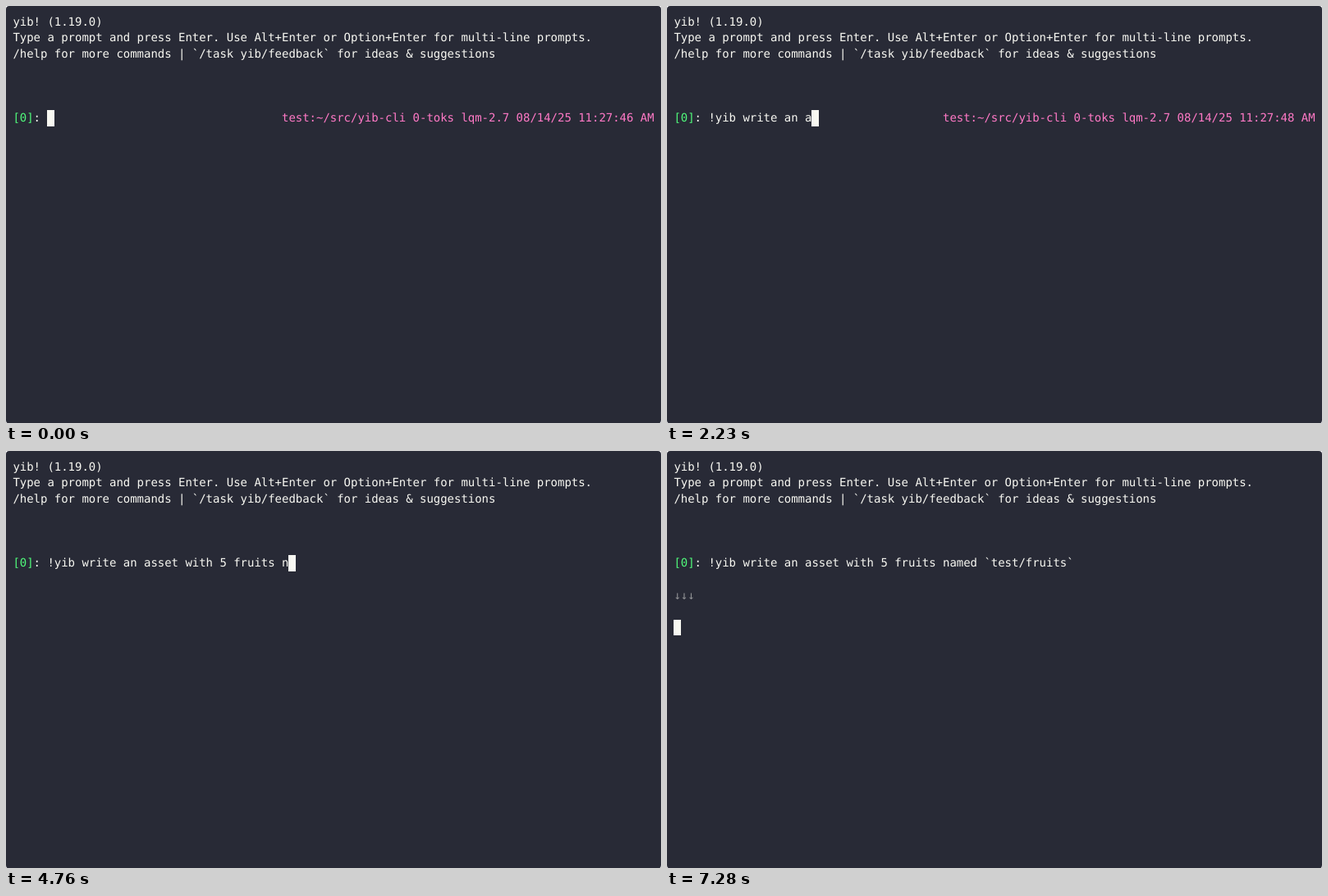
Animation, 798 px wide and 509 px high, one loop 8000 ms. Source, as an HTML page:

```html
<!DOCTYPE html>
<html lang="en">
<head>
<meta charset="utf-8">
<title>Terminal session</title>
<style>
  html, body { margin: 0; width: 100%; height: 100%; overflow: hidden; background: #fff; }
  svg { display: block; width: 798px; height: 509px; }
  text {
    font: 14px "DejaVu Sans Mono", monospace;
    white-space: pre;
    text-rendering: geometricPrecision;
  }
</style>
</head>
<body>
<svg id="screen" viewBox="0 0 798 509"></svg>
<script>
const LOOP = 8000;
const CELL_W = 8.4, LINE_H = 19.6, PAD_X = 8.4, PAD_Y = 9.8, FONT = 14;
const BG = '#282a36', FG = '#f8f8f2', GREEN = '#50fa7b', PINK = '#ff79c6';
const PROMPT_ROW = 6, INPUT_COL = 5, STATUS_COL = 39;
const ENTER_AT = 7280;
const TICK_OFFSET = 570; // ms already elapsed in the clock's first second

const KEYS = '!yib write an asset with 5 fruits named `test/r\bfruits`';

// Bursts of typing: first key time, last key time, number of keys
const BURSTS = [
  [820, 820, 1], [1140, 1780, 8], [1830, 1880, 2], [2040, 2290, 5],
  [2430, 2750, 5], [2840, 3180, 5], [3310, 3570, 3], [3650, 3710, 2],
  [3850, 3940, 2], [4300, 4300, 1], [4760, 5000, 4], [5170, 5170, 1],
  [5350, 5400, 2], [5610, 5610, 1], [5705, 5705, 2], [5800, 5800, 1],
  [6040, 6110, 2], [6360, 6830, 7], [7040, 7040, 1]
];
const keyTimes = BURSTS.flatMap(([from, to, n]) =>
  Array.from({ length: n }, (_, i) => n > 1 ? from + (to - from) * i / (n - 1) : from));

const screen = document.getElementById('screen');
const cellX = col => PAD_X + col * CELL_W;
const cellY = row => PAD_Y + row * LINE_H;

function add(tag, attrs) {
  const el = document.createElementNS('http://www.w3.org/2000/svg', tag);
  for (const name in attrs) el.setAttribute(name, attrs[name]);
  return screen.appendChild(el);
}

// Places each character on the terminal grid
function write(el, col, row, str) {
  el.setAttribute('x', [...str].map((_, i) => cellX(col + i).toFixed(2)).join(' ') || 0);
  el.setAttribute('y', (cellY(row) + FONT).toFixed(2));
  el.textContent = str;
}

function label(col, row, str, fill, opacity = 1) {
  const el = add('text', { fill, opacity });
  write(el, col, row, str);
  return el;
}

function moveCursor(col, row, fill) {
  const x = Math.round(cellX(col)), y = Math.round(cellY(row));
  cursor.setAttribute('x', x);
  cursor.setAttribute('y', y);
  cursor.setAttribute('width', Math.round(cellX(col + 1)) - x);
  cursor.setAttribute('height', Math.round(cellY(row + 1)) - y);
  cursor.setAttribute('fill', fill);
}

function typedText(count) {
  let out = '';
  for (const key of KEYS.slice(0, count)) out = key === '\b' ? out.slice(0, -1) : out + key;
  return out;
}

function statusText(time) {
  const sec = 46 + Math.floor((time + TICK_OFFSET) / 1000);
  return `test:~/src/yib-cli 0-toks lqm-2.7 08/14/25 11:27:${sec} AM`;
}

add('rect', { width: 798, height: 509.6, rx: 4, fill: BG });
label(0, 0, 'yib! (1.19.0)', FG);
label(0, 1, 'Type a prompt and press Enter. Use Alt+Enter or Option+Enter for multi-line prompts.', FG);
label(0, 2, '/help for more commands | `/task yib/feedback` for ideas & suggestions', FG);
label(0, PROMPT_ROW, '[0]', GREEN);
label(3, PROMPT_ROW, ':', FG);
const input = label(INPUT_COL, PROMPT_ROW, '', FG);
const status = label(STATUS_COL, PROMPT_ROW, '', PINK);
const arrows = label(0, 8, '↓↓↓', FG, 0.5);
const cursor = add('rect', {});
const covered = label(0, PROMPT_ROW, '', BG);

function render(count, entered) {
  const text = typedText(count);
  const col = INPUT_COL + text.length;
  const right = col <= STATUS_COL ? statusText(count ? keyTimes[count - 1] : 0) : '';
  const under = col === STATUS_COL ? right[0] : '';
  write(input, INPUT_COL, PROMPT_ROW, text);
  write(status, STATUS_COL, PROMPT_ROW, right);
  write(covered, col, PROMPT_ROW, under);
  arrows.setAttribute('visibility', entered ? 'visible' : 'hidden');
  if (entered) moveCursor(0, 10, FG);
  else moveCursor(col, PROMPT_ROW, under ? PINK : FG);
}

const start = performance.now();
let shown = '';

function frame() {
  const t = (performance.now() - start) % LOOP;
  const count = keyTimes.filter(k => k <= t).length;
  const entered = t >= ENTER_AT;
  const state = count + '|' + entered;
  if (state !== shown) {
    shown = state;
    render(count, entered);
  }
  requestAnimationFrame(frame);
}
frame();
</script>
</body>
</html>
```
